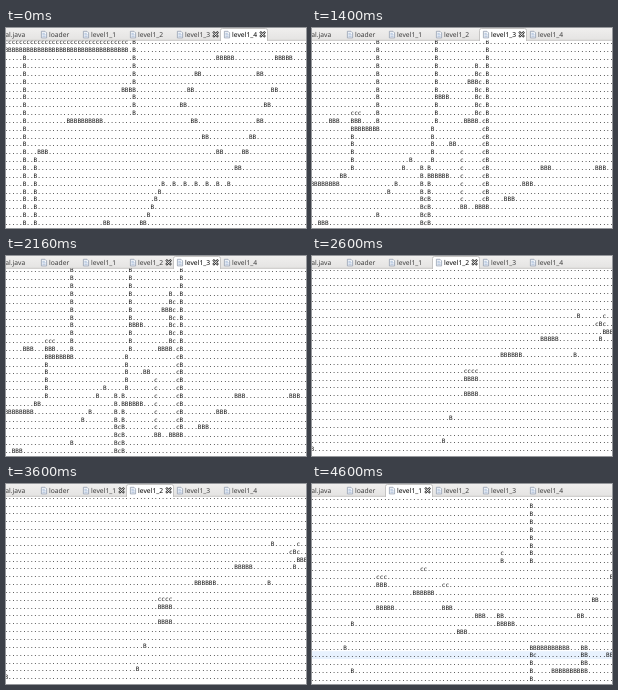
An HTML page that plays this animation: 300 by 200 pixels, repeating every 5000 ms.

```html
<!DOCTYPE html>
<html lang="en">
<head>
<meta charset="utf-8">
<title>Level editor tabs</title>
<style>
  html, body { margin: 0; width: 100%; height: 100%; overflow: hidden; background: #fff; }
  svg { display: block; width: 300px; height: 200px; }
  text { text-rendering: geometricPrecision; }
  .code { font: 60.63px "DejaVu Sans Mono", monospace; fill: #161616; }
  .label { font: 67.5px "Noto Sans", "Open Sans", sans-serif; fill: #3c3c3c; }
  .active .label { fill: #000; }
  .show { opacity: 0; animation: 5s step-end infinite; }
  #level4 { animation-name: level4; }
  #level3 { animation-name: level3; }
  #level2 { animation-name: level2; }
  #level1 { animation-name: level1; }
  #hover3 { animation-name: hover3; }
  #hover2 { animation-name: hover2; }
  #hover1 { animation-name: hover1; }
  @keyframes level4 { 0% { opacity: 1 } 28%, 100% { opacity: 0 } }
  @keyframes level3 { 0% { opacity: 0 } 28% { opacity: 1 } 52%, 100% { opacity: 0 } }
  @keyframes level2 { 0% { opacity: 0 } 52% { opacity: 1 } 80%, 100% { opacity: 0 } }
  @keyframes level1 { 0% { opacity: 0 } 80%, 100% { opacity: 1 } }
  @keyframes hover3 { 0% { opacity: 1 } 18%, 100% { opacity: 0 } }
  @keyframes hover2 { 0% { opacity: 0 } 30% { opacity: 1 } 52%, 100% { opacity: 0 } }
  @keyframes hover1 { 0% { opacity: 0 } 60% { opacity: 1 } 80%, 100% { opacity: 0 } }
</style>
</head>
<body>
<svg id="stage" viewBox="0 0 300 200">
  <defs>
    <linearGradient id="barFill" x2="0" y2="1">
      <stop stop-color="#f0efee"/><stop offset="1" stop-color="#e4e3e2"/>
    </linearGradient>
    <g id="file">
      <path d="M.4 .4H4L5.6 2V7H.4Z" fill="#f7f9fc" stroke="#8794a8" stroke-width=".7"/>
      <path d="M1.4 2.4H3.8M1.4 3.9H4.6M1.4 5.4H4.6" stroke="#7f9cc4" stroke-width=".6"/>
    </g>
    <g id="close" fill="none" stroke-linecap="square">
      <path d="M1.3 1.3L4.7 4.7M4.7 1.3L1.3 4.7" stroke="#333" stroke-width="2.3"/>
      <path d="M1.3 1.3L4.7 4.7M4.7 1.3L1.3 4.7" stroke="#fff" stroke-width=".9"/>
    </g>
    <clipPath id="editor"><rect y="12.6" width="300" height="188"/></clipPath>
  </defs>
</svg>
<script>
const COLS = 83, ROWS = 24, CELL = 3.65, LINE = 7.85, LEFT = -1.6, BASE = 16.4;

// Each run is "column text"; a key "a-b" repeats its runs on rows a to b.
const levels = {
  level4: {
    shift: 0,
    rows: {
      '0': ['0 ' + 'c'.repeat(34)],
      '1': ['0 ' + 'B'.repeat(34)],
      '0-9': ['35 B'],
      '2-23': ['5 B'],
      '15-23': ['8 B'],
      '2': ['58 BBBBB', '74 BBBBB'],
      '4': ['52 BB', '69 BB'],
      '6': ['32 BBBB', '50 BB', '73 BB'],
      '8': ['48 BB', '71 BB'],
      '10': ['17 BBBBBBBBBB', '51 BB', '69 BB'],
      '12': ['54 BB', '67 BB'],
      '14': ['9 BBB', '58 BB', '65 BB'],
      '16': ['63 BB'],
      '18': ['43 B..B..B..B..B..B..B'],
      '19': ['42 B'],
      '20': ['41 B'],
      '21': ['40 B'],
      '22': ['39 B'],
      '23': ['27 BB', '37 BB']
    }
  },
  level3: {
    shift: 0,
    rows: {
      '0-10': ['18 B', '34 B'],
      '0-21': ['48 B'],
      '3': ['45 B'],
      '4-9': ['45 Bc'],
      '5': ['43 BBBc'],
      '7': ['34 BBBB'],
      '9': ['11 ccc'],
      '10': ['5 BBB', '11 BBB', '42 BBBB'],
      '10-20': ['47 c'],
      '11': ['11 BBBBBBBB'],
      '11-15': ['33 B'],
      '12-16': ['11 B'],
      '13': ['38 BB'],
      '14-20': ['41 c'],
      '15': ['27 B'],
      '16': ['25 B', '63 BBB', '78 BBB'],
      '16-19': ['30 B.B'],
      '17': ['8 BB', '32 BBBBBB'],
      '18': ['0 BBBBBBBB', '23 B', '58 BBB'],
      '19': ['21 B'],
      '20-23': ['30 BcB'],
      '20': ['53 BBB'],
      '21': ['41 BB', '45 BBBB'],
      '22': ['18 B'],
      '23': ['2 BBB']
    }
  },
  level2: {
    shift: -1.7,
    rows: {
      '6': ['73 B', '80 c'],
      '7': ['78 cBc'],
      '8': ['80 BBB'],
      '9': ['63 BBBBB', '79 B'],
      '11': ['52 BBBBBB', '72 B'],
      '13': ['42 cccc'],
      '14': ['42 BBBB'],
      '16': ['42 BBBB'],
      '19': ['38 B'],
      '22': ['36 B'],
      '23': ['0 B']
    }
  },
  level1: {
    shift: 0,
    currentRow: 20,
    rows: {
      '1-8': ['60 B'],
      '7': ['52 c', '82 c'],
      '8': ['52 B'],
      '9': ['30 cc'],
      '10': ['18 ccc', '82 B'],
      '11': ['18 BBB', '36 cc'],
      '12': ['28 BBBBBB'],
      '13': ['77 BB'],
      '14': ['18 BBBBB', '36 BBB'],
      '15': ['45 BBB', '51 BB', '73 BB'],
      '16': ['11 B', '51 BBBBB'],
      '17': ['40 BBB'],
      '19': ['9 B', '60 BBBBBBBBBBB', '74 BB'],
      '20': ['60 Bc', '74 BB', '81 BB'],
      '20-23': ['60 B'],
      '21': ['74 BB'],
      '22': ['11 B', '66 BBBBBBBBBB']
    }
  }
};

const tabX = number => 77 + 47 * (number - 1);
const text = (type, x, y, content) =>
  `<text class="${type}" transform="translate(${x} ${y}) scale(.1)">${content}</text>`;
const use = (id, x, y) => `<use href="#${id}" x="${x}" y="${y}"/>`;
const tab = (x, name) => use('file', x, 2.9) + text('label', x + 8, 9, name);
const closeButton = number => use('close', tabX(number) + 35.6, 3.3);

function buildGrid(rows) {
  const grid = Array.from({ length: ROWS }, () => Array(COLS).fill('.'));
  for (const [range, runs] of Object.entries(rows)) {
    const [first, last = first] = range.split('-').map(Number);
    for (let row = first; row <= last; row++) {
      for (const run of runs) {
        const [column, letters] = run.split(' ');
        [...letters].forEach((letter, i) => {
          if (letter !== '.' && +column + i < COLS) grid[row][+column + i] = letter;
        });
      }
    }
  }
  return grid.map(cells => cells.join(''));
}

function activeTab(number) {
  const x = tabX(number);
  return `<g class="active">
    <path d="M${x - 3.5} 13V2.5Q${x - 3.5} .5 ${x - 1.5} .5H${x + 41.5}Q${x + 43.5} .5 ${x + 43.5} 2.5V13"
      fill="#fff" stroke="#b9b8b7" stroke-width=".8"/>
    ${tab(x, 'level1_' + number)}${closeButton(number)}</g>`;
}

function levelView([id, { rows, shift, currentRow }]) {
  const lines = buildGrid(rows).map((line, row) =>
    text('code', LEFT, BASE + shift + row * LINE, line)).join('');
  const highlight = currentRow === undefined ? '' :
    `<rect y="${BASE - 6.2 + currentRow * LINE}" width="300" height="${LINE}" fill="#e8f2fe"/>`;
  return `<g id="${id}" class="show">${activeTab(+id.slice(-1))}
    <g clip-path="url(#editor)">${highlight}${lines}</g></g>`;
}

const numbers = [1, 2, 3, 4];
const bar = `<rect width="300" height="12.5" fill="url(#barFill)"/>
  <path d="M0 12.3H300" stroke="#b9b8b7" stroke-width=".7"/>`;
const tabs = text('label', -4, 9, 'cal.java') + tab(35, 'loader') +
  numbers.map(n => tab(tabX(n), 'level1_' + n)).join('');
const hovers = [1, 2, 3].map(n =>
  `<g id="hover${n}" class="show">${closeButton(n)}</g>`).join('');

document.getElementById('stage').insertAdjacentHTML('beforeend',
  bar + tabs + hovers + Object.entries(levels).map(levelView).join(''));
</script>
</body>
</html>
```
